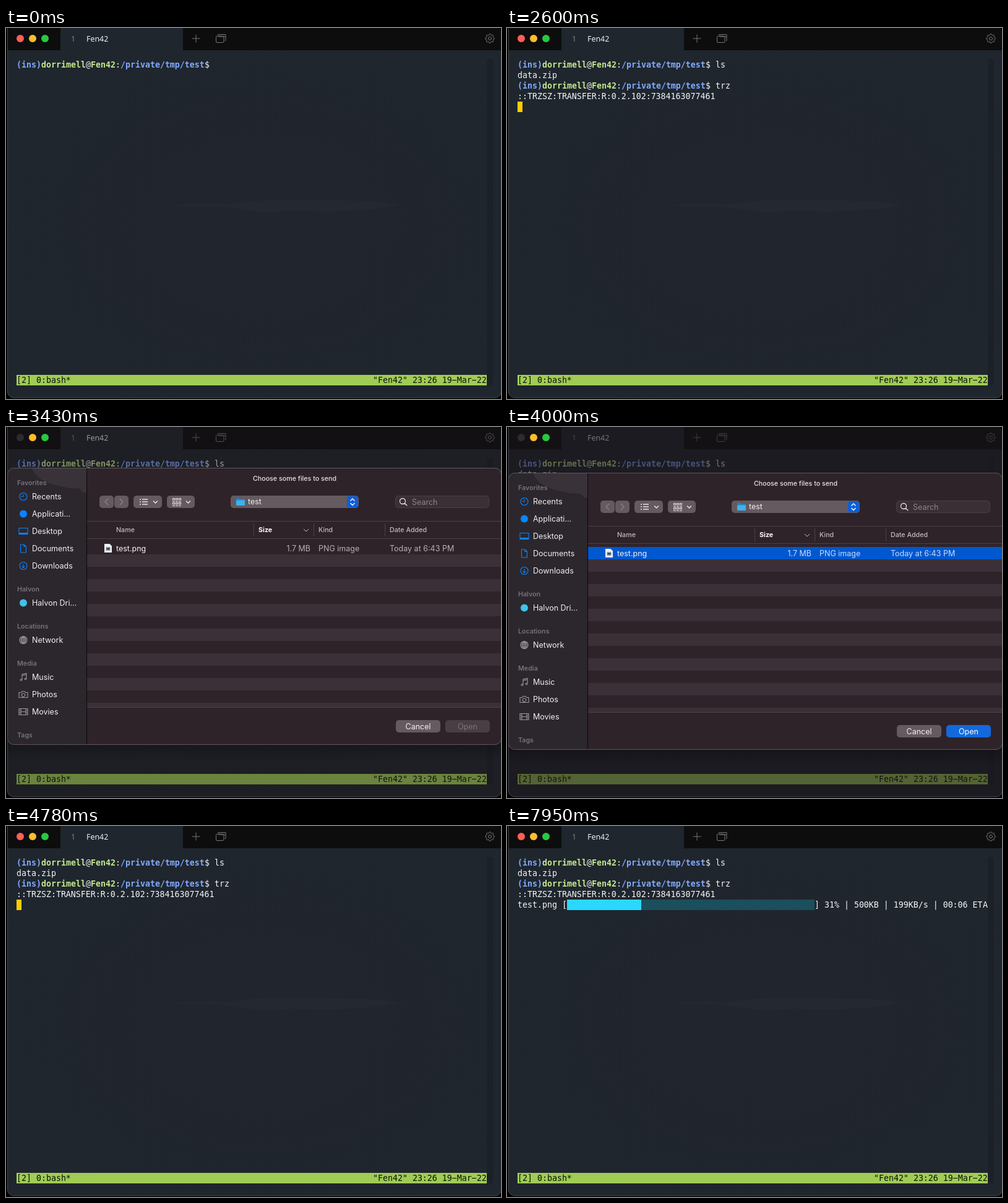
These frames come from a looping animation (800x600 px, 8000 ms). An HTML page:

```html
<!DOCTYPE html>
<html lang="en">
<head>
<meta charset="utf-8">
<title>Terminal file transfer</title>
<style>
  html, body { margin: 0; width: 100%; height: 100%; overflow: hidden; background: #000; }
  svg { display: block; width: 800px; height: 600px; }
  text { white-space: pre; }
  .mono text { font: 13.288px "DejaVu Sans Mono", "Liberation Mono", monospace; fill: #f4f6f8; }
  .mono .b { font-weight: 700; }
  .mono .dark { fill: #0c0f0a; }
  .tab { font: 12.4px "Noto Sans", "Open Sans", sans-serif; }
  .ui { font: 12.5px Inter, Roboto, sans-serif; }
  .sm { font: 500 10.7px Inter, Roboto, sans-serif; }
  .bold { font-weight: 700; }
</style>
</head>
<body>
<svg viewBox="0 0 800 600" xmlns="http://www.w3.org/2000/svg">
  <defs>
    <clipPath id="win"><rect x="2" y="-2" width="798.5" height="600" rx="10"/></clipPath>
    <clipPath id="panel"><rect x="2.5" y="0" width="798" height="448" rx="10"/></clipPath>
    <radialGradient id="glow" cx=".52" cy=".5" r=".62">
      <stop offset=".25" stop-color="#21252d"/><stop offset="1" stop-color="#1f262d"/>
    </radialGradient>
    <linearGradient id="shadow" x2="0" y2="1">
      <stop stop-color="#000" stop-opacity=".3"/><stop offset="1" stop-color="#000" stop-opacity="0"/>
    </linearGradient>
    <pattern id="mesh" width="2" height="2" patternUnits="userSpaceOnUse">
      <path d="M0 0h1v1h-1zM1 1h1v1h-1z" fill="#16788c" shape-rendering="crispEdges"/>
    </pattern>
  </defs>
  <rect width="800" height="600"/>
  <g clip-path="url(#win)">
    <rect y="36" width="801" height="564" fill="url(#glow)"/>
    <rect width="801" height="36" fill="#0d0d0e"/>
    <rect x="88" width="198" height="36" fill="#1f262d"/>
    <path d="M262 287Q310 283 358 285C400 277 470 276 530 279Q600 278 635 286Q600 295 540 296C500 300 480 292 430 298C395 299 380 290 340 289Q300 290 262 287Z" fill="#242931"/>
    <rect x="777" y="50" width="10" height="528" rx="4" fill="#1c2128"/>
    <g class="tab">
      <text x="105" y="21.5" fill="#7d8085">1</text>
      <text id="title" x="130" y="21.5" fill="#eceef0"></text>
    </g>
    <g fill="none" stroke="#76777a">
      <path d="M300.5 17H313.5M307 10.5V23.5M342.5 11.5V10.5H355V20.5H354M343 14H355"/>
      <rect x="339.5" y="13" width="12.5" height="10.5" rx="1.5"/>
      <path id="gear"/><circle cx="782" cy="17" r="2.5"/>
    </g>
    <g id="term" class="mono"></g>
    <rect id="shade" width="801" height="600" fill="#191519"/>
  </g>
  <rect x="2.5" y="-10" width="798" height="608" rx="10" fill="none" stroke="#45494e"/>
  <circle id="close" cx="23" cy="17" r="6"/>
  <circle cx="43" cy="17" r="6" fill="#febc2e"/>
  <circle cx="63" cy="17" r="6" fill="#28c840"/>
  <g id="sheet"></g>
</svg>
<script>
const LOOP = 8000;
const USER = "dorrimell", HOST = "Fen42", CLOUD = "Halvon";
const $ = id => document.getElementById(id);
const last = (list, t) => list.filter(e => e[0] <= t).pop();

const rect = (x, y, w, h, fill, extra = "") =>
  `<rect x="${x}" y="${y}" width="${w}" height="${h}" fill="${fill}" ${extra}/>`;
const line = (d, stroke, extra = "") => `<path d="${d}" fill="none" stroke="${stroke}" ${extra}/>`;
const label = (x, y, s, fill, cls = "ui", extra = "") =>
  `<text x="${x}" y="${y}" fill="${fill}" class="${cls}" ${extra}>${s}</text>`;

// ---- terminal: 8 x 17 cells, origin at 17,51 ----
const BLUE = "#82aaff", GREEN = "#c3e88d", WHITE = "#f4f6f8";
const cellX = c => 17 + 8 * c, rowY = r => 51 + 17 * r;
const put = (c, r, s, fill = WHITE, cls = "") =>
  `<text x="${cellX(c)}" y="${rowY(r) + 13}" class="${cls}" style="fill:${fill}">${s}</text>`;
const cursor = (c, r) => rect(cellX(c), rowY(r), 8, 17, "#ffcc00");

function prompt(r, cmd) {
  let c = 0;
  const runs = [["(ins)", BLUE], [USER, GREEN], ["@", WHITE], [HOST, GREEN],
    [":", WHITE], ["/private/tmp/test", BLUE], ["$ " + cmd, WHITE]];
  return runs.map(([s, fill]) => {
    const out = put(c, r, s, fill, fill === WHITE ? "" : "b");
    c += s.length;
    return out;
  }).join("");
}

// time, percent, amount, speed, seconds left
const progress = [[5470, 6, 100, 162, 8], [6070, 12, 200, 171, 8], [6550, 18, 300, 186, 7], [7410, 31, 500, 199, 6]];
// time, column, row; a missing column hides the cursor
const cursors = [[0], [110, 40, 0], [770, 41, 0], [860, 42, 0], [1190, 40, 2], [1790, 41, 2], [1940, 42, 2],
  [2210, 43, 2], [2480, 0, 3], [2600, 0, 4], [5050], [5470, 94, 4], [7200], [7410, 94, 4], [7950]];
const typed = (word, times, t) => word.slice(0, times.filter(k => k <= t).length);

function terminal(t) {
  let out = prompt(0, typed("ls", [770, 860], t));
  if (t >= 1190) out += put(0, 1, "data.zip") + prompt(2, typed("trz", [1790, 1940, 2210], t));
  if (t >= 2600) out += put(0, 3, "::TRZSZ:TRANSFER:R:0.2.102:7384163077461");
  const [, c, r] = last(cursors, t);
  const step = last(progress, t);
  if (step) {
    const [, pct, size, speed, left] = step;
    const done = 8 * Math.floor(pct / 2);
    out += put(0, 4, "test.png [") + rect(97 + done, 119, 400 - done, 17, "url(#mesh)") +
      rect(97, 119, done, 17, "#2ad8ff") +
      put(60, 4, `] ${String(pct).padStart(2)}% | ${size}KB | ${speed}KB/s | 00:0${left} ET`) +
      (c === undefined ? put(94, 4, "A") : cursor(c, r) + put(94, 4, "A", "#20242a"));
  } else if (c !== undefined) out += cursor(c, r);
  const ink = "#0c0f0a";
  return out + rect(17, 561, 760, 17, "#a0cc55") + put(0, 30, "[2] 0:bash*", ink) +
    put(72, 30, `"${HOST}" 23:26 19\u2212Mar\u221222`, ink);
}

// ---- file chooser ----
const ring = r => `M${-r} 0a${r} ${r} 0 1 0 ${2 * r} 0a${r} ${r} 0 1 0 ${-2 * r} 0`;
const icons = {
  clock: ring(6) + "M0-3.8V0H-3.5",
  screen: "M-7-5H7V5H-7ZM-7 3H7M-7 4H7",
  page: "M-4.5-6.5H1L4.5-3V6.5H-4.5ZM1-6.5V-3H4.5",
  down: ring(6) + "M0-3V3M-2.5 .6L0 3.1 2.5 .6",
  globe: ring(6) + "M-6 0H6M0-6V6M0-6C-4-3-4 3 0 6C4 3 4-3 0-6M-5-3H5M-5 3H5",
  note: "M-2 4V-4.5L5-6V2.5M-2-2.5L5-4M-5 4.5a1.5 1.2 0 1 0 3 0a1.5 1.2 0 1 0-3 0M2 3a1.5 1.2 0 1 0 3 0a1.5 1.2 0 1 0-3 0",
  camera: "M-7-3H-3.5L-2-5H2L3.5-3H7V5H-7ZM-2.8 1a2.8 2.8 0 1 0 5.6 0a2.8 2.8 0 1 0-5.6 0",
  film: "M-7-5H7V5H-7ZM-4-5V5M4-5V5M-4 0H4M-7-1.7H-4M-7 1.7H-4M4-1.7H7M4 1.7H7"
};
const sections = [
  ["Favorites", [["clock", "Recents"], ["dot", "Applicati..."], ["screen", "Desktop"], ["page", "Documents"], ["down", "Downloads"]]],
  [CLOUD, [["dot", CLOUD + " Dri..."]]],
  ["Locations", [["globe", "Network"]]],
  ["Media", [["note", "Music"], ["camera", "Photos"], ["film", "Movies"]]],
  ["Tags", [["tag", "Red", "#a5494d"], ["tag", "Orange", "#9c6a2d"], ["tag", "Yellow", "#98842f"]]]
];

const warm = { bg: "#2f232a", stripe: "#3b3037", rule: "#4b4046", edge: "#5f565b", control: "#645a60", field: "#3a2f35", off: "#483e43" };
const themes = {
  idle: { ...warm, side: "#3c3236", head: "#81777c", item: "#857b80", blue: "#305f9e", cloud: "#35788c", grey: "#776d72" },
  live: { ...warm, side: "#2b272d", head: "#77727a", item: "#f1edef", blue: "#0a84ff", cloud: "#3fc3e8", grey: "#9b969b" },
  fade: { bg: "#1e1e1e", stripe: "#292929", rule: "#444", edge: "#666", control: "#5a5a5a", field: "#2a2a2a", off: "#333",
    side: "#3c3c3c", head: "#858585", item: "#f4f4f4", blue: "#0c0c0c", cloud: "#0c0c0c", grey: "#0c0c0c" }
};

function sidebar(c, idle) {
  let out = "", y = 28;
  for (const [name, items] of sections) {
    if (idle && name === "Locations") continue;
    out += label(18, y, name, c.head, "sm", 'style="font-weight:600"');
    y += 23;
    for (const [kind, text, tint] of items) {
      const color = tint || (name === CLOUD ? c.cloud : name === "Favorites" ? c.blue : c.grey);
      out += icons[kind]
        ? line(icons[kind], color, `transform="translate(28 ${y - 4.5})" stroke-width="1.1"`)
        : `<circle cx="28" cy="${y - 4.5}" r="${kind === "tag" ? 5 : 6}" fill="${color}"/>`;
      out += label(42, y, text, c.item);
      y += 28;
    }
    y += 9;
  }
  return out;
}

function toolbar(c, idle) {
  const ink = "#e6e1e4", faint = "#8d8489";
  const button = (x, w) => rect(x, 45, w, 20, c.control, 'rx="5"');
  const arrow = x => line(`M${x} 53.5l3.5 3.5 3.5-3.5`, ink, 'stroke-width="1.5"');
  let out = button(151, 23) + button(175, 23) + button(206, 46) + button(260, 45) + button(363, 207) +
    line("M165 50l-5 5 5 5M184 50l5 5-5 5", faint, 'stroke-width="1.2"') + arrow(238) + arrow(291);
  for (let i = 0; i < 3; i++) {
    const y = 51 + 4 * i;
    out += line(`M216 ${y}h2M220 ${y}h9`, ink, 'stroke-width="1.3"');
    if (i < 2) for (let j = 0; j < 3; j++)
      out += rect(269.5 + 5 * j, 49.5 + 7 * i, 3, 2.5, "none", `stroke="${ink}"`) +
        line(`M${269 + 5 * j} ${54.5 + 7 * i}h4`, ink);
  }
  out += `<path d="M372 50q0-1 1-1h4l1.5 1.5H385q1 0 1 1V60q0 1-1 1H373q-1 0-1-1Z" fill="#1d86c8"/>` +
    rect(372, 52.5, 14, 8.5, "#3cb2ee", 'rx="1"') + label(391, 59, "test", "#f3eff1");
  if (!idle) out += rect(551, 46, 18, 18, "#0c5fd6", 'rx="4"');
  return out + line("M556.5 53.5L560 50l3.5 3.5M556.5 57L560 60.5l3.5-3.5", "#fff", 'stroke-width="1.4"') +
    rect(629.5, 45.5, 151, 19, c.field, `rx="5" stroke="${c.rule}"`) +
    line("M636.5 54a4.5 4.5 0 1 0 9 0a4.5 4.5 0 1 0-9 0M644.3 57.3l4 4", ink, 'stroke-width="1.3"') +
    label(656, 59.5, "Search", faint);
}

function sheet({ y, theme, picked, alpha }) {
  const c = themes[theme], idle = theme === "idle";
  const head = "#c3bbc0", soft = picked ? "#cbdcf5" : "#b7aeb3";
  let out = rect(2, 0, 799, 448, c.bg);
  for (let s = 140; s < 388; s += 40) out += rect(131, s, 670, Math.min(20, 388 - s), c.stripe);
  if (picked) out += rect(131, 120, 670, 20, "#0058d0");
  out += rect(2, 0, 128, 448, c.side);
  if (theme === "live") out += `<path d="M42 0H130V40H124C118 28 110 36 98 32C80 28 50 24 42 0Z" fill="#393339"/>`;
  out += line("M130.5 0V448", "#0b090a") + sidebar(c, idle) + toolbar(c, idle) +
    line("M131 86.5H801M131 114.5H801M131 387.5H801M400.5 90V111M497.5 90V111M612.5 90V111", c.rule) +
    label(466.5, 21, "Choose some files to send", "#e9e4e7", "sm", 'text-anchor="middle"') +
    label(178, 104, "Name", head, "sm") + label(408, 104, "Size", "#fff", "sm bold") +
    line("M481 99l4 4 4-4", head) + label(505, 104, "Kind", head, "sm") + label(620, 104, "Date Added", head, "sm") +
    `<path d="M159 123h8.5l3.5 3.5V137h-12Z" fill="#f2f2f2"/>` +
    rect(161.5, 128, 7, 6, "#8796a8") + rect(162.5, 130, 5, 2, "#2b3645") +
    label(178, 135, "test.png", "#f5f2f4") + label(492, 135, "1.7 MB", soft, "ui", 'text-anchor="end"') +
    label(505, 135, "PNG image", soft) + label(620, 135, "Today at 6:43 PM", soft) +
    rect(630, 408, 72, 20, c.control, 'rx="5"') + label(666, 422.5, "Cancel", "#f3eff1", "ui", 'text-anchor="middle"') +
    rect(710, 408, 72, 20, picked ? "#1369dc" : c.off, 'rx="5"') +
    label(746, 422.5, "Open", picked ? "#fff" : "#7d7378", "ui", 'text-anchor="middle"');
  return rect(3, y + 440, 797, 34, "url(#shadow)") + `<g transform="translate(0 ${y})" opacity="${alpha}">
    <g clip-path="url(#panel)">${out}</g>${rect(2.5, .5, 798, 447, "none", `rx="10" stroke="${c.edge}"`)}</g>`;
}

const dialog = [
  [0, null],
  [3160, { y: 42, theme: "idle", alpha: 1, shade: 0 }],
  [3430, { y: 66, theme: "live", alpha: 1, shade: .4 }],
  [3520, { y: 74, theme: "live", alpha: 1, shade: .57 }],
  [4000, { y: 74, theme: "live", alpha: 1, shade: .57, picked: true }],
  [4450, { y: 70, theme: "fade", alpha: .8, shade: .42, picked: true }],
  [4780, null]
];

function render(t) {
  const d = last(dialog, t)[1];
  $("term").innerHTML = terminal(t);
  $("sheet").innerHTML = d ? sheet(d) : "";
  $("shade").setAttribute("opacity", d ? d.shade : 0);
  $("close").setAttribute("fill", d && d.shade ? "#2c2c2e" : "#ff5f57");
}

// eight-toothed settings wheel
const teeth = Array.from({ length: 32 }, (_, i) => {
  const a = (i - .5) * Math.PI / 16, r = i % 4 < 2 ? 7.4 : 5.7;
  return `${(782 + r * Math.cos(a)).toFixed(2)} ${(17 + r * Math.sin(a)).toFixed(2)}`;
});
$("gear").setAttribute("d", `M${teeth.join("L")}Z`);
$("title").textContent = HOST;

// redraw only when a scheduled change has been passed
const marks = [...new Set([...cursors, ...progress, ...dialog].map(e => e[0]))];
const start = performance.now();
let shown = -1;
function tick() {
  const t = (performance.now() - start) % LOOP;
  const now = Math.max(...marks.filter(m => m <= t));
  if (now !== shown) render(shown = now);
  requestAnimationFrame(tick);
}
tick();
</script>
</body>
</html>
```
